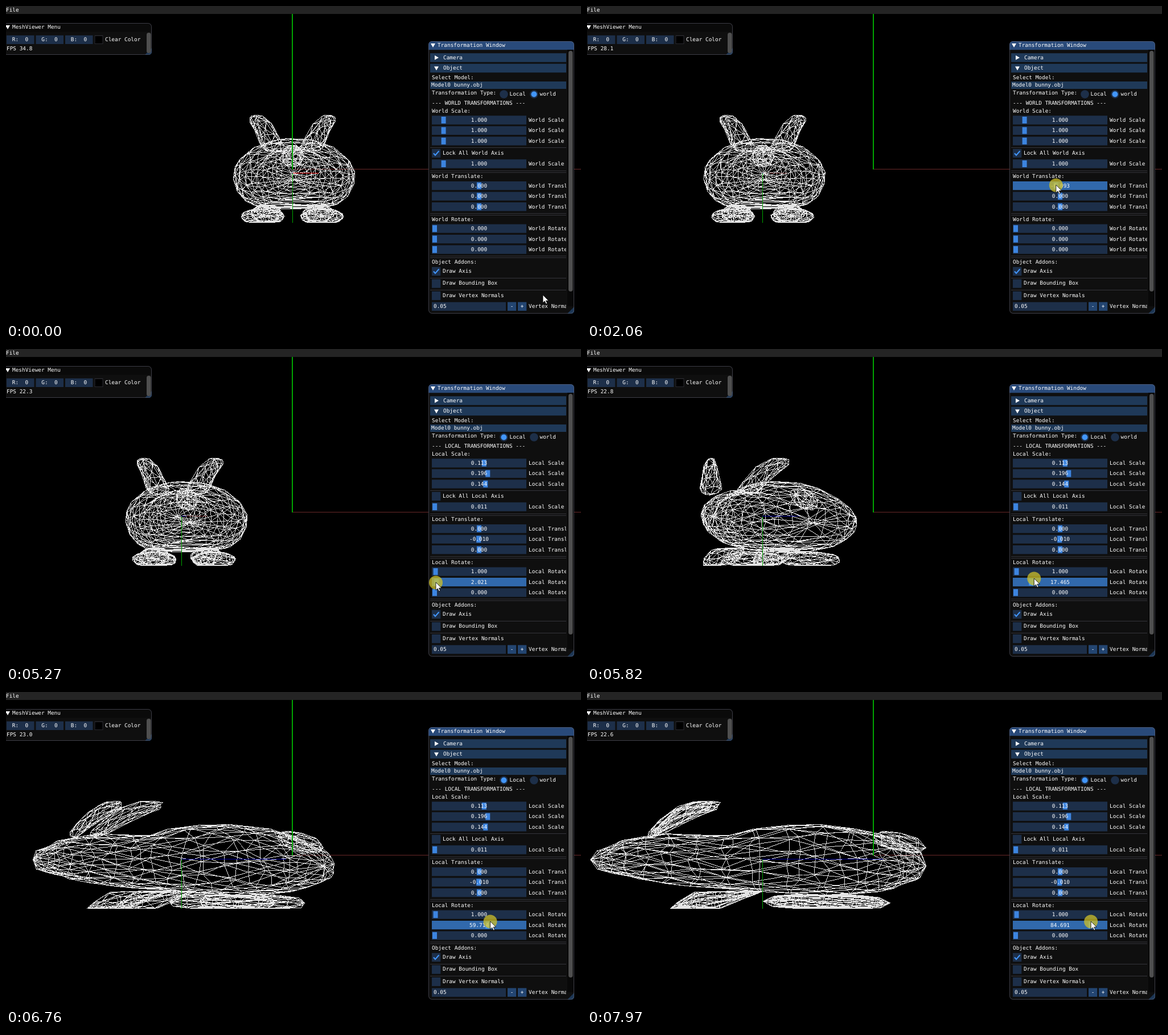
An HTML page with a canvas for the animation above (8 s loop, 1010 by 555 pixels).

```html
<!DOCTYPE html>
<html lang="en">
<head>
<meta charset="utf-8">
<title>Mesh viewer</title>
<style>
  html, body { margin: 0; width: 100%; height: 100%; overflow: hidden; background: #000; }
  canvas { display: block; }
</style>
</head>
<body>
<canvas id="stage" width="1010" height="555"></canvas>
<script>
const W = 1010, H = 555, LOOP = 8000, LOCAL_AT = 3730;
const ctx = document.getElementById('stage').getContext('2d');
const image = ctx.createImageData(W, H);
const pixels = new Uint32Array(image.data.buffer);
const rgb = (r, g, b) => (255 << 24 | b << 16 | g << 8 | r) >>> 0;
const mix = (a, b, u) => a + (b - a) * u;

const C = {
  window: '#0f0f0f', border: 'rgba(110,110,128,.5)', title: '#294a7a',
  frame: '#1d2f49', frameHover: '#23456d', frameActive: '#3169ac',
  header: '#1f3958', headerHover: '#387bcb', button: '#234571',
  grab: '#3d85e0', accent: '#4296fa', scroll: '#4f4f4f', grip: '#1c3655'
};

// Timelines: [ms, values...], straight between keys
const pointerKeys = [[70, 943, 509], [800, 832, 320], [910, 831, 317], [1700, 823, 316],
  [2150, 824, 315], [2600, 848, 347], [3300, 867, 116], [3510, 880, 153], [3760, 880, 153],
  [4400, 757, 409], [4750, 755, 411]];
const shiftKeys = [[950, 0], [1700, -0.093]];
const turnKeys = [[5200, 0], [5260, 2.021], [5340, 2.021], [6230, 30.598], [6760, 59.686],
  [7640, 84.691]];
const fpsKeys = [[0, 34.8], [2060, 28], [3660, 24.6], [5270, 22.3], [6230, 23.2], [7970, 22.6]];
const presses = [[860, 2130], [3500, 3900], [4740, LOOP]];

function at(keys, t, col = 1) {
  const i = keys.findIndex(k => k[0] > t);
  if (i <= 0) return keys[i < 0 ? keys.length - 1 : 0][col];
  const a = keys[i - 1], b = keys[i];
  return mix(a[col], b[col], (t - a[0]) / (b[0] - a[0]));
}

// While turning, the pointer runs a little ahead of the slider value
function pointer(t) {
  if (t > 5340) return [753 + 1.56 * at(turnKeys, t + 100), 404];
  return [at(pointerKeys, t, 1), at(pointerKeys, t, 2)];
}

// Mesh: x sideways, y down the screen, z towards the nose
const verts = [], edges = [];
let seed = 7;
const rand = () => (seed = seed * 16807 % 2147483647) / 2147483647;
const jitter = size => (rand() * 2 - 1) * size;

// Smooth curve through evenly spaced values
const curve = p => u => {
  const i = Math.min(p.length - 2, Math.floor(u * (p.length - 1))), f = u * (p.length - 1) - i;
  const a = p[i], b = p[i + 1], before = p[i - 1] ?? a, after = p[i + 2] ?? b;
  return a + f / 2 * (b - before +
    f * (2 * before - 5 * a + 4 * b - after + f * (3 * (a - b) + after - before)));
};
const cap = (u, power) => Math.sqrt(1 - Math.abs(2 * u - 1) ** power);

// Skin of triangles around the cross-sections shape(u) = { x, y, z, h, w }
function loft(n, rings, shape, { side = 1, tilt = 0, wobble = 3, boxy = 1 } = {}) {
  const base = verts.length;
  const id = (r, k) => base + r * n + (k + n) % n;
  for (let r = 0; r <= rings; r++) {
    const s = r / rings, { x, y, z, h, w } = shape(s - 0.09 * Math.sin(2 * Math.PI * s));
    const odd = r % 2;
    for (let k = 0; k < n; k++) {
      const a = (k + odd / 2 + jitter(0.3)) / n * 2 * Math.PI;
      const sin = Math.sin(a), cos = Math.cos(a);
      const across = sin > 0 ? Math.sign(cos) * Math.abs(cos) ** boxy : cos;
      verts.push([side * (x + w * across),
        Math.min(381, y + h * sin * Math.cos(tilt)),
        z - h * sin * Math.sin(tilt) + jitter(Math.min(wobble, h / 4))]);
      edges.push([id(r, k), id(r, k + 1)]);
      if (r < rings) edges.push([id(r, k), id(r + 1, k)], [id(r, k), id(r + 1, k + 2 * odd - 1)]);
    }
  }
}

const back = curve([272, 257, 248, 254, 239, 232, 236, 253, 272]);
const belly = curve([318, 338, 351, 357, 340]);
const girth = curve([30, 58, 86, 107, 95]);
loft(16, 16, u => ({
  x: 3, y: (back(u) + belly(u)) / 2, z: mix(304, -288, u),
  h: (belly(u) - back(u)) / 2 * cap(u, 12), w: girth(u) * cap(u, 12)
}), { wobble: 9, boxy: 0.5 });

const tail = u => ({
  x: 0, y: mix(254, 274, u), z: mix(-195, -288, u), h: 16 * cap(u, 3), w: 20 * cap(u, 3)
});
const ear = u => ({
  x: mix(34, 70, u), y: mix(248, 200, u) - 8 * Math.sin(Math.PI * u),
  z: mix(196, 86, u) + 5 * Math.sin(Math.PI * u),
  h: 8 + 19 * Math.sin(Math.PI * u ** 0.7), w: 20 - 14 * u
});
const hindFoot = u => ({
  x: 52, y: mix(368, 371, u), z: mix(-6, -220, u), h: 13 * cap(u, 4), w: 38 * cap(u, 4)
});
const foreLeg = u => {
  const top = 380 - 30 * Math.sin(Math.PI / 2 * Math.min(1, 3 * u));
  const bottom = 381 - 30 * Math.max(0, 2 * u - 1);
  return { x: 46, y: (top + bottom) / 2, z: mix(157, 5, u), h: (bottom - top) / 2,
    w: 14 + 14 * Math.sin(Math.PI * u) };
};
loft(7, 4, tail);
for (const side of [-1, 1]) {
  loft(8, 5, ear, { side, tilt: 2.6 });
  loft(9, 6, hindFoot, { side, wobble: 6, boxy: 0.5 });
  loft(8, 6, foreLeg, { side });
}

function line(x0, y0, x1, y1, color) {
  const dx = x1 - x0, dy = y1 - y0;
  const n = Math.max(1, Math.round(Math.max(Math.abs(dx), Math.abs(dy))));
  for (let i = 0; i <= n; i++) {
    const x = Math.round(x0 + dx * i / n), y = Math.round(y0 + dy * i / n);
    if (x >= 0 && x < W && y >= 0 && y < H) pixels[y * W + x] = color;
  }
}

function drawScene(shift, degrees) {
  const cx = 502.6 + shift * 2091, a = degrees * Math.PI / 180;
  const cos = Math.cos(a), sin = Math.sin(a);
  const px = v => cx + v[0] * cos - v[2] * sin;
  const green = rgb(0, 165, 0), white = rgb(228, 228, 228);
  pixels.fill(rgb(0, 0, 0));
  line(503, 287, W, 287, rgb(105, 40, 40));
  if (shift) line(cx, 294, cx + 45 * cos, 294, rgb(96, 0, 0));
  for (const [i, j] of edges) {
    const p = verts[i], q = verts[j];
    line(px(p), p[1], px(q), q[1], white);
  }
  if (!shift) line(cx, 294, cx + 45, 294, rgb(224, 0, 0));
  line(cx, 294, cx + 212 * sin, 294, rgb(0, 0, 160));
  line(cx, 295, cx, 381, green);
  for (const x of [502, 503]) line(x, 14, x, 287, green);
  ctx.putImageData(image, 0, 0);
}

// Interface helpers
const ROW = 15.3;
function box(x, y, w, h, color, r = 0) {
  ctx.fillStyle = color;
  ctx.beginPath();
  ctx.roundRect(x, y, w, h, r);
  ctx.fill();
}
const frame = (x, y, w, color = C.frame) => box(x, y - ROW / 2, w, ROW, color);
function disc(x, y, r, color) {
  ctx.fillStyle = color;
  ctx.beginPath();
  ctx.arc(x, y, r, 0, 7);
  ctx.fill();
}
function text(s, x, y, align = 'left') {
  ctx.fillStyle = '#fff';
  ctx.textAlign = align;
  ctx.fillText(s, x, y);
}
function poly(points, color) {
  ctx.fillStyle = color;
  ctx.beginPath();
  points.forEach(p => ctx.lineTo(...p));
  ctx.closePath();
  ctx.fill();
}
function arrow(x, y, open) {
  poly(open ? [[x - 4, y - 3], [x + 4, y - 3], [x, y + 4]]
            : [[x - 3, y - 4], [x + 4, y], [x - 3, y + 4]], '#fff');
}
function panel(x, y, w, h, titleColor, title) {
  box(x, y, w, h, C.window, 6);
  box(x, y, w, ROW, titleColor, [6, 6, 0, 0]);
  arrow(x + 8, y + 7, true);
  text(title, x + 16, y + 7.5);
  poly([[x + w, y + h - 12], [x + w, y + h - 3], [x + w - 3, y + h], [x + w - 12, y + h]], C.grip);
  ctx.strokeStyle = C.border;
  ctx.lineWidth = 1;
  ctx.beginPath();
  ctx.roundRect(x + 0.5, y + 0.5, w - 1, h - 1, 6);
  ctx.stroke();
}
function check(y, label, on) {
  frame(748, y, ROW);
  if (on) {
    ctx.strokeStyle = C.accent;
    ctx.lineWidth = 2;
    ctx.beginPath();
    ctx.moveTo(751, y);
    ctx.lineTo(754, y + 3.5);
    ctx.lineTo(760.5, y - 4);
    ctx.stroke();
  }
  text(label, 767, y);
}
function radio(x, label, on) {
  disc(x, 155.5, 7.3, C.frame);
  if (on) disc(x, 155.5, 5, C.accent);
  text(label, x + 10, 156);
}
function slider(y, label, value, [min, max], color) {
  frame(748, y, 166, color);
  const x = 753 + 156 * (value - min) / (max - min);
  box(x - 4, y - 6, 8, 12, color === C.frameActive ? C.accent : C.grab);
  text(value.toFixed(3), 831, y + 0.5, 'center');
  text(label, 918, y + 0.5);
}

function drawMenu(fps) {
  box(0, 0, W, 14, '#242424');
  text('File', 0, 7.5);
  panel(-5, 30, 261, 56, '#0a0a0a', 'MeshViewer Menu');
  [...'RGB'].forEach((name, i) => {
    frame(1 + i * 51.5, 59.3, 48.5);
    text(name + ':  0', 25 + i * 51.5, 59.5, 'center');
  });
  frame(155.5, 59.3, 15, '#2b2b30');
  box(156.5, 53, 13, 13, '#000');
  text('Clear Color', 174, 59.5);
  text('FPS ' + fps.toFixed(1), 1, 76);
  box(247, 47, 7.5, 36, C.scroll, 4);
}

function drawTransform(t, shift, turn, mx, my) {
  const local = t >= LOCAL_AT, space = local ? 'Local' : 'World';
  const over = (y, right) => Math.abs(my - y) < ROW / 2 && mx > 745 && mx < right;
  const dragShift = t > 890 && t < 2130, dragTurn = t > 5200;

  panel(742, 62, 256, 480, C.title, 'Transformation Window');
  box(986, 77, 11, 452, '#080808');
  box(988, 79, 7.5, 424, C.scroll, 4);

  ctx.save();
  ctx.beginPath();
  ctx.rect(743, 78, 241, 463);
  ctx.clip();

  const bar = (y, h) => box(745, y - h / 2, 239, h, over(y, 984) ? C.headerHover : C.header);
  const header = (y, label, open) => {
    bar(y, ROW);
    arrow(756, y, open);
    text(label, 768, y + 0.5);
  };
  header(91, 'Camera', false);
  header(109.5, 'Object', true);
  text('Select Model:', 748, 126.5);
  bar(139.5, 13);
  text('Model0 bunny.obj', 747, 140);
  text('Transformation Type:', 748, 154);
  radio(874.5, 'Local', local);
  radio(927.5, 'world', !local);
  text(`--- ${space.toUpperCase()} TRANSFORMATIONS ---`, 748, 172);

  const unit = [-1, 1], scaleRange = [0, 10];
  const group = (kind, top, values, range, dragged) => {
    text(`${space} ${kind}:`, 748, top);
    values.forEach((value, i) => {
      const y = top + 15.7 + 18.45 * i;
      const idle = !dragShift && !dragTurn && over(y, 914) ? C.frameHover : C.frame;
      slider(y, `${space} ${kind} ${'XYZ'[i]}`, value, range, i === dragged ? C.frameActive : idle);
    });
  };
  group('Scale', 185.3, local ? [0.113, 0.196, 0.144] : [1, 1, 1], local ? unit : scaleRange);
  check(259.5, `Lock All ${space} Axis`, !local);
  slider(278, space + ' Scale', local ? 0.011 : 1, scaleRange, C.frame);
  group('Translate', 301, local ? [0, -0.01, 0] : [shift, 0, 0], unit, dragShift ? 0 : -1);
  group('Rotate', 376.5, local ? [1, turn, 0] : [0, 0, 0], [0, 100], dragTurn ? 1 : -1);

  for (const y of [249, 290, 293, 365, 368, 440, 443, 479, 500]) box(745, y, 239, 1, '#35353b');
  text('Object Addons:', 748, 452);
  ['Axis', 'Bounding Box', 'Vertex Normals'].forEach((name, i) =>
    check(467.5 + 21.5 * i, 'Draw ' + name, i === 0));
  frame(748, 529.3, 130);
  text('0.05', 751, 529.5);
  [...'-+'].forEach((sign, i) => {
    frame(881 + 18 * i, 529.3, ROW, C.button);
    text(sign, 888.6 + 18 * i, 529.5, 'center');
  });
  text('Vertex Normal Size', 918, 529.5);
  ctx.restore();
}

function drawPointer(t, x, y) {
  if (presses.some(([from, to]) => t >= from && t < to)) disc(x, y + 0.5, 12, 'rgba(205,192,40,.75)');
  const shape = [[0, 0], [0, 14], [3.2, 11], [5.6, 16], [7.8, 15], [5.5, 10.2], [10, 10.2]];
  poly(shape.map(([dx, dy]) => [x + dx, y + dy]), '#fff');
  ctx.strokeStyle = '#000';
  ctx.lineWidth = 0.8;
  ctx.stroke();
}

function draw(t) {
  const shift = at(shiftKeys, t), turn = at(turnKeys, t), [mx, my] = pointer(t);
  drawScene(shift, turn);
  ctx.font = '9.42px "DejaVu Sans Mono", monospace';
  ctx.textBaseline = 'middle';
  ctx.textRendering = 'geometricPrecision';
  drawMenu(at(fpsKeys, Math.floor(t / 70) * 70));
  drawTransform(t, shift, turn, mx, my);
  drawPointer(t, mx, my);
}

const start = performance.now();
function tick() {
  draw((performance.now() - start) % LOOP);
  requestAnimationFrame(tick);
}
tick();
</script>
</body>
</html>
```
